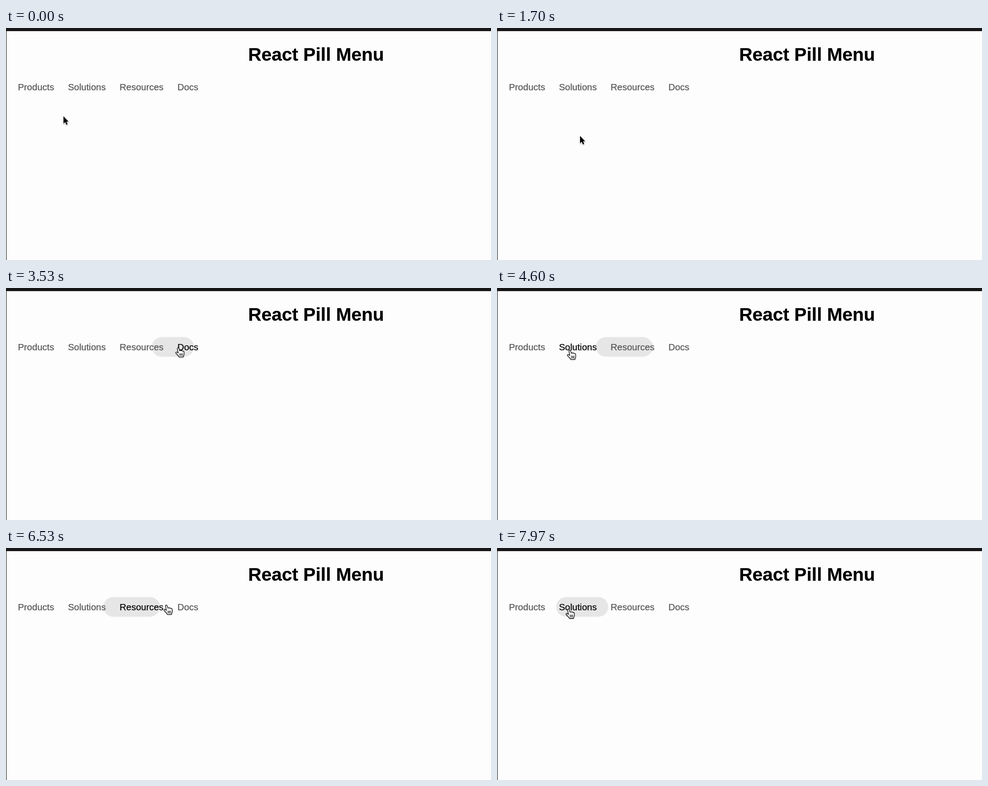
An HTML page for the animation above (8 s loop, 1080 by 518 pixels).

```html
<!DOCTYPE html>
<html lang="en">
<head>
<meta charset="utf-8">
<title>React Pill Menu</title>
<style>
  html, body { margin: 0; width: 100%; height: 100%; overflow: hidden; background: #fdfdfd; }
  svg { display: block; }
  text { font: 20.48px "Liberation Sans", Arial, sans-serif; fill: #555; stroke: #555; stroke-width: .25; }
  text.active { fill: #000; stroke: #000; }
  .title { font-size: 40.96px; font-weight: bold; fill: #000; stroke: #000; text-anchor: middle; }
  #cursor { filter: drop-shadow(0 1px 1px rgba(0, 0, 0, .35)); }
</style>
</head>
<body>
<svg width="1080" height="518" viewBox="0 0 1080 518">
  <rect width="1080" height="518" fill="#fdfdfd"/>
  <rect width="1080" height="7" fill="#171516"/>
  <rect width="1.2" height="518" fill="#222"/>
  <text class="title" x="690.5" y="73">React Pill Menu</text>
  <rect id="pill" y="109.5" height="44" rx="22" fill="#e6e6e6"/>
  <g id="menu"></g>
  <g id="cursor">
    <path id="arrow" d="M0 0V16.5L3.8 13 6.3 19 9.2 17.8 6.7 12H11.3Z"
      stroke="#fff" stroke-width="1.6" paint-order="stroke"/>
    <g id="hand" transform="translate(-1 0)" stroke="#000" stroke-width="1.3" stroke-linecap="round" stroke-linejoin="round">
      <path fill="#fff" d="M-2.2 2.2C-2.6 .2 .4 -.4 1.2 1.6L3.2 7.5C3.6 5.9 6.2 5.9 6.7 7.6 7.4 6.3 9.7 6.7 10.1 8.4
        11 7.5 12.6 8.2 12.6 10V14C12.6 17 11.2 18 11 21H1.8C.8 18-2.5 16-5.3 12.5-6.7 10.8-4.6 9.2-3 10.4L-.3 12.4Z"/>
      <path fill="none" d="M3.4 13.5V18M6.1 13.5V18M8.8 13.5V18"/>
    </g>
  </g>
</svg>
<script>
const LOOP = 8000, SLIDE = 250, PADDING = 15.4, TOP = 109.5, BOTTOM = 153.5;
const $ = id => document.getElementById(id);
const mix = (a, b, p) => a + (b - a) * p;

// Pointer gestures: start, end, and the point reached
const moves = [
  [0, 1, 128, 197],
  [30, 330, 108, 178],
  [400, 830, 168, 139],
  [870, 1000, 171, 132],
  [1170, 1330, 185, 241],
  [1695, 2130, 186, 140],
  [2500, 3000, 348, 138],
  [3270, 3670, 399, 131],
  [3900, 4300, 291, 134],
  [4530, 4620, 147, 139],
  [4970, 5110, 88, 143],
  [5110, 5230, 92, 234],
  [5230, 5480, 88, 146],
  [6000, 6300, 197, 132],
  [6330, 6550, 362, 127],
  [6770, 7130, 408, 131],
  [7130, 7500, 258, 135],
  [7730, 7990, 159, 136]
].map(([start, end, x, y]) => ({ start, end, x, y }));

// Each item is as wide as its label plus padding on both sides
let right = 11;
const items = ['Products', 'Solutions', 'Resources', 'Docs'].map(label => {
  const el = document.createElementNS('http://www.w3.org/2000/svg', 'text');
  el.textContent = label;
  el.setAttribute('x', right + PADDING);
  el.setAttribute('y', 139);
  $('menu').appendChild(el);
  const x = right, w = el.getComputedTextLength() + 2 * PADDING;
  right += w;
  return { el, x, w };
});

// CSS "ease": cubic-bezier(.25, .1, .25, 1)
function ease(p) {
  if (p >= 1) return 1;
  const bezier = (s, a, b) => 3 * a * s * (1 - s) ** 2 + 3 * b * s * s * (1 - s) + s ** 3;
  let lo = 0, hi = 1;
  for (let i = 0; i < 20; i++) {
    const mid = (lo + hi) / 2;
    if (bezier(mid, .25, .25) < p) lo = mid; else hi = mid;
  }
  return bezier(lo, .1, 1);
}

function pointerAt(t) {
  const i = moves.findLastIndex(m => m.start <= t);
  const to = moves[i], from = moves[i - 1] || to;
  const u = Math.min(1, (t - to.start) / (to.end - to.start)), p = u * u * (3 - 2 * u);
  return { x: mix(from.x, to.x, p), y: mix(from.y, to.y, p), from };
}

const inMenu = y => y > TOP && y < BOTTOM;
const itemAt = ({ x, y }) => inMenu(y) ? items.findIndex(it => x >= it.x && x < it.x + it.w) : -1;

// Leaving the menu only registers once the next gesture begins
function hoveredAt(t) {
  const pointer = pointerAt(t), item = itemAt(pointer);
  return item < 0 ? itemAt(pointer.from) : item;
}

const hovers = [{ start: 0, item: -1 }];
for (let t = 0; t < LOOP; t++) {
  const item = hoveredAt(t);
  if (item !== hovers.at(-1).item) hovers.push({ start: t, item });
}

function draw(t) {
  const i = hovers.findLastIndex(h => h.start <= t), { start, item } = hovers[i];
  items.forEach(({ el }, n) => el.classList.toggle('active', n === item));

  $('pill').style.display = item < 0 ? 'none' : '';
  if (item >= 0) {
    const to = items[item], from = items[hovers[i - 1].item] || to;
    const p = ease((t - start) / SLIDE);
    $('pill').setAttribute('x', mix(from.x, to.x, p));
    $('pill').setAttribute('width', mix(from.w, to.w, p));
  }

  const { x, y } = pointerAt(t);
  $('cursor').setAttribute('transform', `translate(${x} ${y})`);
  $('hand').style.display = inMenu(y) ? '' : 'none';
  $('arrow').style.display = inMenu(y) ? 'none' : '';
}

const begin = performance.now();
function tick() {
  draw((performance.now() - begin) % LOOP);
  requestAnimationFrame(tick);
}
tick();
</script>
</body>
</html>
```
